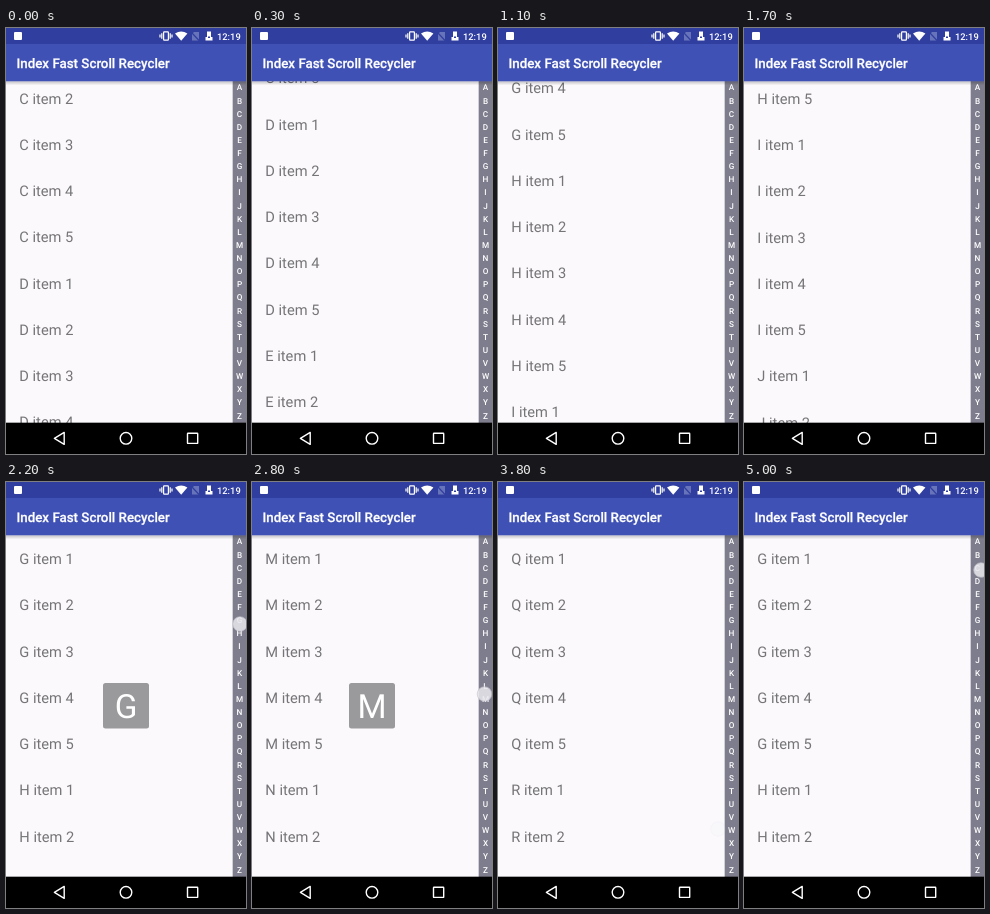
An HTML page for the animation above (5.1 s loop, 240 by 426 pixels).

```html
<!DOCTYPE html>
<html lang="en">
<head>
<meta charset="utf-8">
<title>Index scroll</title>
<style>
  html, body { margin: 0; width: 100%; height: 100%; overflow: hidden; background: #000; }
  svg { display: block; width: 100vw; height: 100vh; }
  text { font-family: Roboto, "Open Sans", sans-serif; fill: #fff; text-rendering: geometricPrecision; }
  .item { font-size: 14.67px; fill: #757477; }
  .index { font-size: 8.2px; font-weight: 500; text-anchor: middle; }
  .title { font-size: 13.33px; font-weight: 500; stroke: #fff; stroke-width: .25; }
  .clock { font-size: 9.33px; font-weight: 500; }
  .big { font-size: 33.3px; text-anchor: middle; }
  .line { fill: none; stroke: #fff; stroke-width: 1.4; }
</style>
</head>
<body>
<svg viewBox="0 0 240 426">
  <defs>
    <linearGradient id="shade" x2="0" y2="1">
      <stop stop-color="#000" stop-opacity=".22"/>
      <stop offset="1" stop-color="#000" stop-opacity="0"/>
    </linearGradient>
  </defs>
  <rect y="53" width="240" height="342" fill="#fbf9fc"/>
  <g id="list"></g>
  <g id="bar"><rect x="226.67" y="53" width="13.33" height="342" fill="#7e7d8d"/></g>
  <rect y="53.3" width="240" height="4" fill="url(#shade)"/>
  <g id="preview">
    <rect x="97" y="201" width="46" height="45.5" rx="2.5" fill="#000" opacity=".39"/>
    <text id="letter" class="big" x="120" y="235.6"></text>
  </g>
  <circle id="touch" r="7.3" fill="#e9e8ee" stroke="#c2c1c9" stroke-width=".7"/>

  <rect y="16" width="240" height="37.3" fill="#3f51b5"/>
  <rect width="240" height="16" fill="#303f9f"/>
  <text class="title" x="10.5" y="39.8">Index Fast Scroll Recycler</text>
  <rect x="8" y="4" width="8" height="8" rx="1" fill="#fff"/>
  <g class="line" style="stroke-width:1.2">
    <rect x="157.6" y="3.8" width="4.8" height="8.4" rx=".6"/>
    <path d="M155.8 5.3v5.4M154 6.5v3M164.2 5.3v5.4M166 6.5v3"/>
  </g>
  <path d="M169 5.5Q175.2 1.5 181.4 5.5L175.2 12.8Z" fill="#fff"/>
  <path d="M188 4h5v8.5h-7V6Z" fill="#6874ba"/>
  <path d="M185.5 4.5l8 8.5" stroke="#303f9f" stroke-width="1.2"/>
  <path d="M201 3.5h4v5.5h1.5v3.5h-7V9h1.5Z" fill="#fff"/>
  <path d="M202 8.5h2v1.6h-2Z" fill="#303f9f"/>
  <text class="clock" x="211" y="11.8">12:19</text>

  <rect y="394.67" width="240" height="32" fill="#000"/>
  <g class="line">
    <path d="M58.2 404.4v12L48.4 410.4Z" stroke-linejoin="round"/>
    <circle cx="120" cy="410.3" r="5.8"/>
    <rect x="181.5" y="405.2" width="10.2" height="10.2" rx=".5"/>
  </g>
</svg>
<script>
  const LOOP = 5100, TICK = 100, ROW = 46.25, PER_LETTER = 5;
  const LETTERS = "ABCDEFGHIJKLMNOPQRSTUVWXYZ";
  const BAR_X = 226.67, BAR_TOP = 53.3, CELL = 341.3 / 26;
  const byId = id => document.getElementById(id);
  const clamp = v => Math.min(1, Math.max(0, v));
  const mix = (a, b, u) => a + (b - a) * u;

  function addText(parent, className, x, y, value = "") {
    const node = document.createElementNS("http://www.w3.org/2000/svg", "text");
    node.setAttribute("class", className);
    node.setAttribute("x", x);
    node.setAttribute("y", y);
    node.textContent = value;
    return parent.appendChild(node);
  }

  [...LETTERS].forEach((c, i) =>
    addText(byId("bar"), "index", 233.5, BAR_TOP + 9.1 + i * CELL, c));
  const rows = Array.from({ length: 9 }, () => addText(byId("list"), "item", 13.3, 0));

  // Fingers on the index bar: press, release, and when the preview goes away
  const tap = (x, y, down, up, gone) => ({ from: [x, y], to: [x, y], down, up, gone });
  const gestures = [
    tap(234, 142, 1950, 2200, 2400),
    { from: [232.5, 212], to: [220, 347], down: 2650, up: 3500, gone: 3800 },
    tap(234, 140, 4350, 4400, 4450),
    tap(237, 88, 5000, 5200, 5400)
  ];
  const HOLD = 150, REACTION = 50;

  const latest = t => gestures.filter(g => t >= g.down).pop();
  const progress = (g, t) => clamp((t - g.down - HOLD) / (g.up - g.down - HOLD));

  // The section follows the finger until it slides off the bar
  function sectionOf(g, t) {
    const leave = (g.from[0] - BAR_X) / (g.from[0] - g.to[0]);
    const y = mix(g.from[1], g.to[1], Math.min(progress(g, t), leave));
    return Math.floor((y - BAR_TOP) / CELL);
  }

  // Two swipes: the first one settles, the second speeds up and glides out
  function swipe(t) {
    if (t < 600) return 15.73 - 4.59 * (1 - t / 600) ** 2;
    if (t < 900) return 15.73 + 10.27 * ((t - 600) / 300) ** 1.8;
    return 39.79 - 13.79 * Math.exp((900 - t) / 262);
  }

  function drawList(scroll) {
    const first = Math.floor(scroll) - 1;
    rows.forEach((row, n) => {
      const i = first + n;
      row.textContent = `${LETTERS[Math.floor(i / PER_LETTER)]} item ${i % PER_LETTER + 1}`;
      row.setAttribute("y", 82.2 + (i - scroll) * ROW);
    });
  }

  function drawTouch(g, t) {
    const u = progress(g, t), touch = byId("touch");
    const fade = Math.max(0, t - g.up) / (g.gone - g.up);
    touch.setAttribute("cx", mix(g.from[0], g.to[0], u));
    touch.setAttribute("cy", mix(g.from[1], g.to[1], u));
    touch.setAttribute("opacity", 0.85 * Math.exp(-2 * fade));
  }

  function draw(t) {
    const finger = latest(t), active = latest(t - REACTION);
    const section = active && sectionOf(active, t);
    drawList(active ? section * PER_LETTER : swipe(t));

    const shown = active && active === finger && t < active.gone;
    byId("preview").setAttribute("visibility", shown ? "visible" : "hidden");
    if (shown) byId("letter").textContent = LETTERS[section];

    byId("touch").setAttribute("visibility", finger ? "visible" : "hidden");
    if (finger) drawTouch(finger, t);
  }

  const start = performance.now();
  function frame() {
    const t = (performance.now() - start) % LOOP;
    draw(Math.floor(t / TICK) * TICK);
    requestAnimationFrame(frame);
  }
  frame();
</script>
</body>
</html>
```
